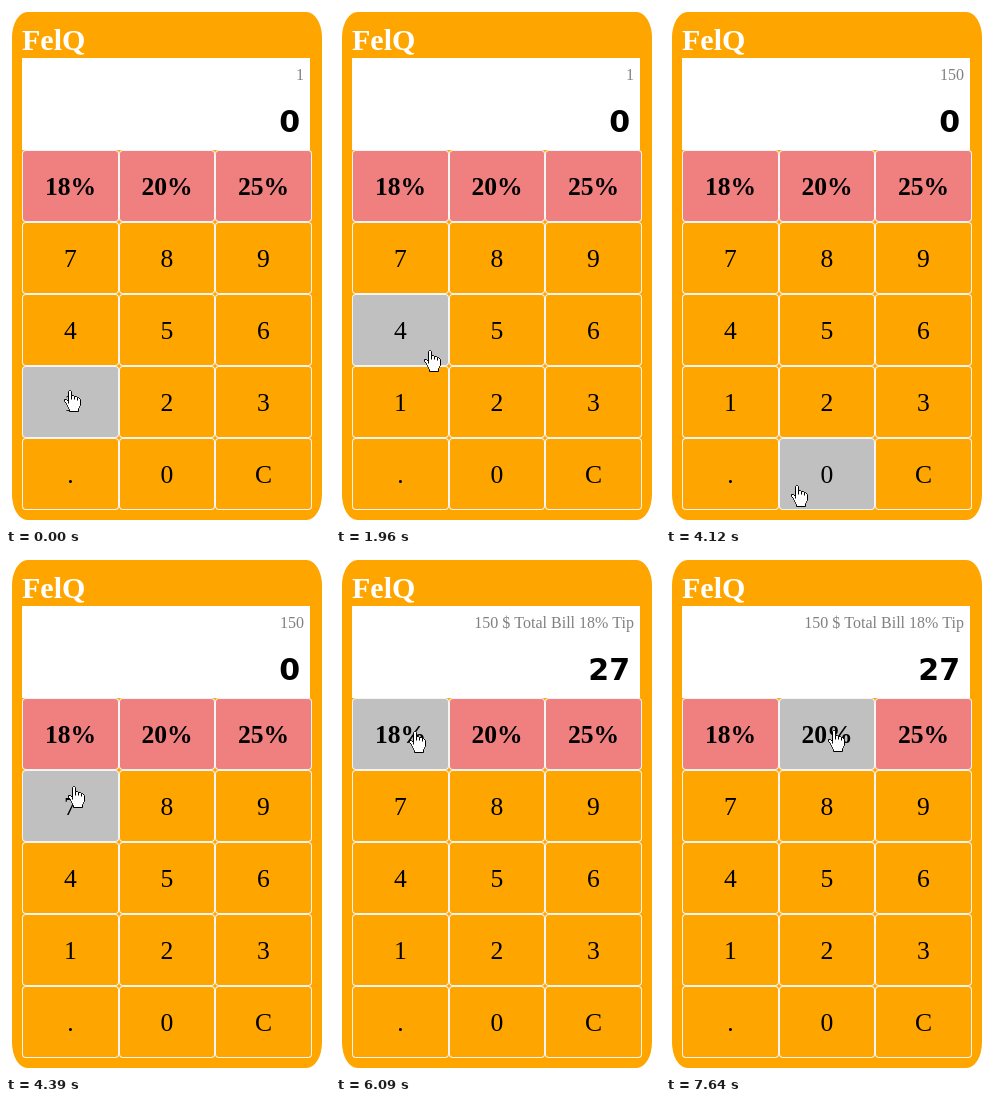
Write an HTML page with a canvas that moves like this. It is 324x520 px and loops after 8 s.

```html
<!DOCTYPE html>
<html lang="en">
<head>
<meta charset="utf-8">
<title>Tip calculator</title>
<style>
  html, body { margin: 0; width: 100%; height: 100%; overflow: hidden; background: #fff; }
  canvas { display: block; }
</style>
</head>
<body>
<canvas id="stage" width="324" height="520"></canvas>
<script>
const ctx = document.getElementById('stage').getContext('2d');
const LOOP = 8000;
const SERIF = '"Liberation Serif", "Times New Roman", serif';
const SANS = '"DejaVu Sans", Verdana, sans-serif';
const KEYS = ['18%', '20%', '25%', '7', '8', '9', '4', '5', '6', '1', '2', '3', '.', '0', 'C'];
const COLS = [16, 113, 209, 306];
const TOP = 144, ROW = 72;

// time, pointer x, pointer y, hovered key
const POINTER = [
  [0, 58, 384, '1'],
  [840, 59, 384, '1'],
  [1120, 63, 384, '1'],
  [1250, 68, 383, '1'],
  [1400, 76, 372, '1'],
  [1830, 75, 373, '1'],
  [1960, 88, 344, '4'],
  [2110, 116, 336, '5'],
  [2230, 140, 328, '5'],
  [2540, 129, 395, '5'],
  [2690, 143, 479, '0'],
  [4120, 125, 479, '0'],
  [4270, 92, 346, '4'],
  [4390, 62, 232, '7'],
  [4520, 72, 179, '18%'],
  [4660, 73, 177, '18%'],
  [7220, 130, 200, '20%'],
  [7370, 149, 187, '20%'],
  [7500, 162, 178, '20%'],
  [7640, 162, 176, '20%']
];

// time, entry line, result
const DISPLAY = [
  [0, '1', '0'],
  [2540, '15', '0'],
  [3560, '150', '0'],
  [6090, '150 $ Total Bill 18% Tip', '27']
];

const HAND = new Path2D('M5 0H6L7 1V5H9L10 6H12L13 7H14L16 9V15L15 16V17L14 18V21H5V19L4 18V17' +
  'L3 16V15L2 14V13L0 11V9H2L4 11V1Z');
const FINGERS = new Path2D('M7 5V9M10 6V9M13 7V10M4 11V13');

const at = (steps, t) => steps.findLast(s => s[0] <= t);

function text(str, x, y, font, color, align) {
  ctx.font = font;
  ctx.fillStyle = color;
  ctx.textAlign = align;
  ctx.fillText(str, x, y);
}

function box(x, y, w, h, r, color) {
  ctx.beginPath();
  ctx.roundRect(x, y, w, h, r);
  ctx.fillStyle = color;
  ctx.fill();
}

function drawKey(label, i, hovered) {
  const col = i % 3, x = COLS[col], w = COLS[col + 1] - x;
  const y = TOP + Math.floor(i / 3) * ROW;
  const rate = i < 3;
  box(x, y, w, ROW, 4, '#f5f5f5');
  box(x + 1, y + 1, w - 2, ROW - 2, 3, hovered ? '#c0c0c0' : rate ? '#f08080' : '#ffa500');
  text(label, x + w / 2, y + 45, (rate ? 'bold ' : '') + '25.6px ' + SERIF, '#000', 'center');
}

function drawHand(x, y) {
  ctx.save();
  ctx.translate(x + 0.5, y + 0.5);
  ctx.fillStyle = '#fff';
  ctx.strokeStyle = '#000';
  ctx.lineWidth = 1;
  ctx.fill(HAND);
  ctx.stroke(HAND);
  ctx.stroke(FINGERS);
  ctx.restore();
}

function draw(t) {
  const [, px, py, hover] = at(POINTER, t);
  const [, entry, result] = at(DISPLAY, t);
  ctx.fillStyle = '#fff';
  ctx.fillRect(0, 0, 324, 520);
  box(6, 6, 310, 508, { x: 15.5, y: 25.4 }, '#ffa500');
  text('FelQ', 16, 44, 'bold 30px ' + SERIF, '#fff', 'left');
  box(16, 52, 288, 92, 0, '#fff');
  text(entry, 298, 74, '16px ' + SERIF, '#808080', 'right');
  text(result, 294, 126, 'bold 30px ' + SANS, '#000', 'right');
  KEYS.forEach((label, i) => drawKey(label, i, label === hover));
  drawHand(px, py);
}

const start = performance.now();
function tick() {
  draw((performance.now() - start) % LOOP);
  requestAnimationFrame(tick);
}
tick();
</script>
</body>
</html>
```
